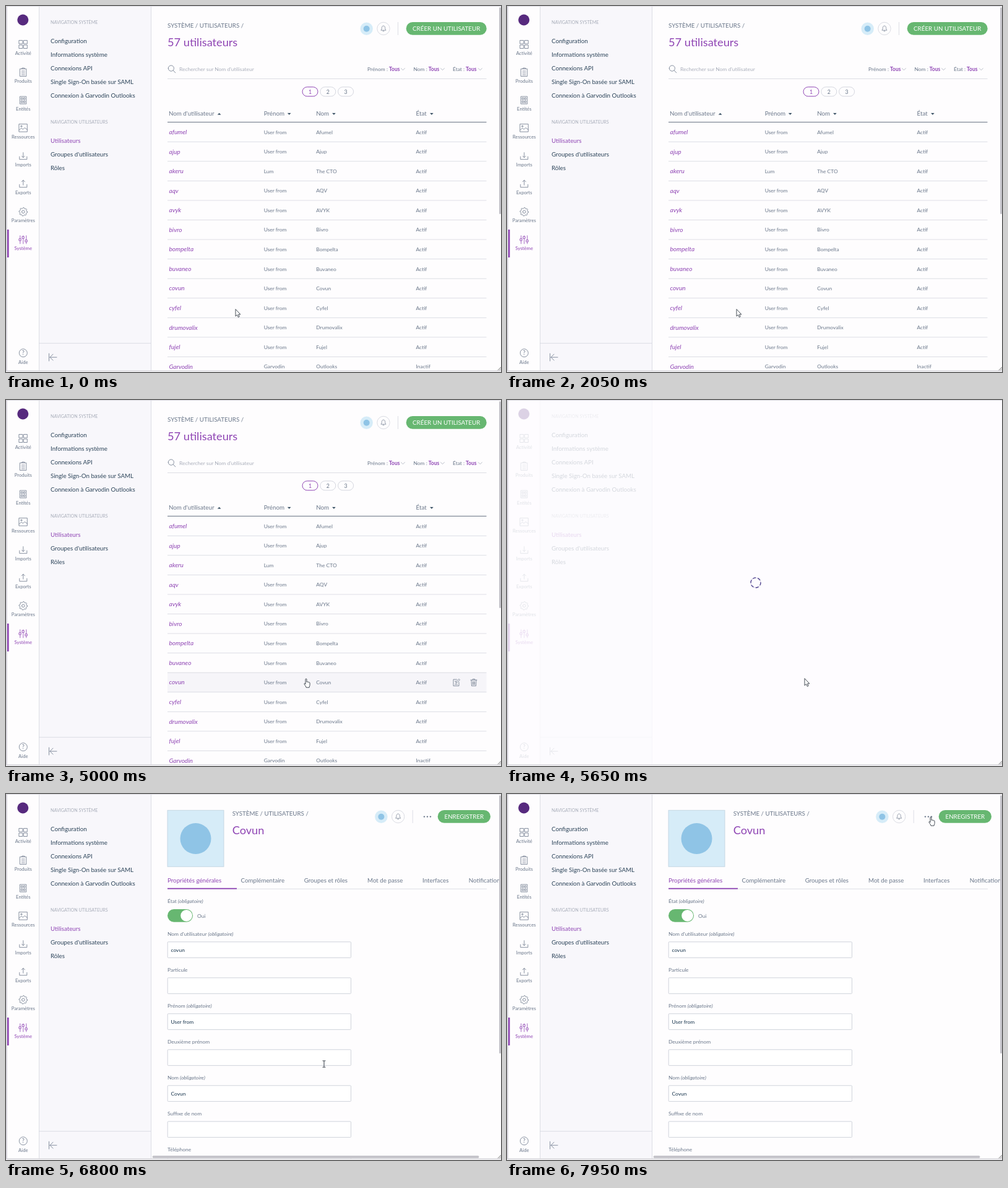
Recreate the animation shown at these times as an HTML page. Size 800 px wide and 591 px high, loop 8000 ms.

```html
<!DOCTYPE html>
<html lang="fr">
<head>
<meta charset="utf-8">
<title>Utilisateurs</title>
<style>
  html, body { margin: 0; width: 100%; height: 100%; overflow: hidden; background: #fefdfe; }
  svg { display: block; width: 100vw; height: 100vh; }
  text { font-family: Lato, "Open Sans", sans-serif; white-space: pre; }
</style>
</head>
<body>
<svg id="stage" viewBox="0 0 800 591" preserveAspectRatio="none"></svg>
<script>
const LOOP = 8000;
const C = {
  page: '#fefdfe', side: '#f8f7fb', line: '#d5d7df', soft: '#a9aeba', grey: '#6a778a',
  dark: '#2c4459', purple: '#8f45b4', green: '#67b771', sky: '#d6ecf8', blue: '#8fc4e6'
};
const NAME = 'Garvodin', TAIL = 'Outlooks', PICK = 'covun';
const cap = s => s[0].toUpperCase() + s.slice(1);

const text = (x, y, s, size, fill = C.grey, more = '') =>
  `<text x="${x}" y="${y}" font-size="${size}" fill="${fill}" ${more}>${s}</text>`;
const rect = (x, y, w, h, fill, more = '') =>
  `<rect x="${x}" y="${y}" width="${w}" height="${h}" fill="${fill}" ${more}/>`;
const disc = (x, y, r, fill, more = '') =>
  `<circle cx="${x}" cy="${y}" r="${r}" fill="${fill}" ${more}/>`;
const path = (x, y, d, color = C.grey, w = .8, fill = 'none') =>
  `<path transform="translate(${x} ${y})" d="${d}" fill="${fill}" stroke="${color}" stroke-width="${w}" stroke-linejoin="round" stroke-linecap="round"/>`;
const box = (x, y, w, h) => `M${x} ${y}h${w}v${h}h${-w}z`;
const ring = (x, y, r) => `M${x - r} ${y}a${r} ${r} 0 1 0 ${2 * r} 0a${r} ${r} 0 1 0 ${-2 * r} 0`;

const gear = () => {
  let d = '';
  for (let i = 0; i < 32; i++) {
    const a = i * Math.PI / 16, r = i % 4 < 2 ? 6.8 : 5.4;
    d += (i ? 'L' : 'M') + (r * Math.cos(a)).toFixed(2) + ' ' + (r * Math.sin(a)).toFixed(2);
  }
  return d + 'z' + ring(0, 0, 2.3);
};

const MENU = [
  ['Activité', box(-6.5, -6.5, 5.5, 5.5) + box(1, -6.5, 5.5, 5.5) + box(-6.5, 1, 5.5, 5.5) + box(1, 1, 5.5, 5.5)],
  ['Produits', box(-5, -5.5, 10, 12) + 'M-2 -5.5v-1.5h4v1.5M-2.5 -2h5M-2.5 1h5M-2.5 4h5'],
  ['Entités', box(-5, -6, 10, 12) + box(-3, -4, 2, 3) + box(1, -4, 2, 3) + box(-3, 1, 2, 3) + box(1, 1, 2, 3)],
  ['Ressources', box(-6.5, -6.5, 13, 12.5) + 'M-6.5 3l3.5 -3l2.5 2l3 -2.5l4 3' + ring(-2.8, -3, 1.1)],
  ['Imports', 'M-6 1v4.5h12v-4.5M0 -5.5v8M-2.3 .2l2.3 2.3l2.3 -2.3'],
  ['Exports', 'M-6 1v4.5h12v-4.5M0 2v-8M-2.6 -3.4l2.6 -2.6l2.6 2.6'],
  ['Paramètres', gear()],
  ['Système', 'M-5 -6.5v5M-5 1.5v5M-6.5 -1.5h3v3h-3zM0 -6.5v1.5M0 -2v8.5M-1.5 -5h3v3h-3zM5 -6.5v7M5 3.5v3M3.5 .5h3v3h-3z']
];

function sidebar() {
  let s = rect(2, 1, 51, 588, C.page) + rect(53, 1, 181.5, 588, C.side) +
    rect(53, 1, .8, 588, C.line) + rect(234, 1, .8, 588, C.line) + rect(53, 544.3, 181, .8, C.line);
  s += disc(27.3, 22.5, 9, '#572a7e') + rect(2, 361, 2.6, 45, C.purple);
  MENU.forEach(([label, d], i) => {
    const y = 62 + 45.05 * i, c = i === 7 ? C.purple : C.grey;
    s += path(27.8, y, d, c) + text(27.8, y + 17, label, 7.7, c, 'text-anchor="middle"');
  });
  s += disc(27.8, 560.3, 6.5, 'none', `stroke="${C.grey}" stroke-width=".8"`) +
    text(27.8, 563.4, '?', 9, C.grey, 'text-anchor="middle"') +
    text(27.8, 577.5, 'Aide', 7.7, C.grey, 'text-anchor="middle"') +
    path(75.5, 567.2, 'M-6 -6v12M6.5 0h-11M.5 -5l-5 5l5 5');
  s += text(72, 29.2, 'NAVIGATION SYSTÈME', 7.15, C.soft) + text(72, 190.3, 'NAVIGATION UTILISATEURS', 7.15, C.soft);
  ['Configuration', 'Informations système', 'Connexions API', 'Single Sign-On basée sur SAML', `Connexion à ${NAME} ${TAIL}`]
    .forEach((l, i) => s += text(72, 60.3 + 21.95 * i, l, 9.75, C.dark));
  ['Utilisateurs', "Groupes d'utilisateurs", 'Rôles']
    .forEach((l, i) => s += text(72, 221.3 + 21.95 * i, l, 9.75, i ? C.dark : C.purple));
  return s;
}

function header(x, title, tools, btn, btnX, btnW) {
  return text(x, 35.1, 'SYSTÈME / UTILISATEURS /', 9.75) + text(x, 64.8, title, 18.2, C.purple) +
    disc(tools, 36.7, 10.2, C.sky) + disc(tools, 36.7, 5, C.blue) +
    disc(tools + 27.3, 36.5, 10.2, C.page, `stroke="${C.line}" stroke-width=".9"`) +
    path(tools + 27.3, 36.3, 'M-3.8 2.6c1.3 -1 1 -3 1.2 -4.2c.3 -3.5 4.9 -3.5 5.2 0c.2 1.2 -.1 3.2 1.2 4.2zM-1 4.2h2', C.grey, .7) +
    rect(tools + 50.4, 26, .8, 21, C.line) +
    rect(btnX, 26, btnW, 20.8, C.green, 'rx="10.4"') +
    text(btnX + btnW / 2, 40.1, btn, 9.8, '#fff', 'text-anchor="middle"');
}

const ROW0 = 187.7, ROW = 31.56;
const USERS = ['afumel', 'ajup', 'akeru', 'aqv', 'avyk', 'bivro', 'bompelta', 'buvaneo', PICK, 'cyfel', 'drumovalix', 'fujel', NAME];

function list() {
  let s = `<g id="hover">${rect(261, 0, 515.5, ROW, '#f6f5f9')}` +
    path(727.5, 16, 'M1 -5h-5.5v10.5h9v-6M-2 -2h2M-2 3h4M-.5 .7l.5 -2l4.5 -4.5l1.5 1.5l-4.5 4.5z') +
    path(756, 16, 'M-5 -4h10M-1.7 -4v-1.5h3.4v1.5M-4 -4l.5 9.5h7l.5 -9.5M-1.6 -1.5v5M0 -1.5v5M1.6 -1.5v5') + '</g>';
  s += header(261, '57 utilisateurs', 582.7, 'CRÉER UN UTILISATEUR', 646.7, 130);
  s += path(266.8, 100.6, ring(0, 0, 4.6) + 'M3.4 3.4l3.6 3.8') +
    text(280, 105, "Rechercher sur Nom d'utilisateur", 8.45, C.soft) + rect(261, 117, 515.5, .8, C.line);
  [[584, 'Prénom :', 619, 641.5], [658.5, 'Nom :', 682.8, 705.5], [722, 'État :', 743, 766.3]].forEach(([x, l, v, a]) =>
    s += text(x, 105, l, 8.45, C.grey) + text(v, 105, 'Tous', 8.45, C.purple, 'font-weight="700"') + path(a, 102, 'M-3 -1.4l3 3l3 -3', C.soft));
  [1, 2, 3].forEach((n, i) => {
    const c = i ? C.grey : C.purple;
    s += rect(479 + 28.8 * i, 130.8, 25, 15, C.page, `rx="7.5" stroke="${i ? C.line : c}"`) +
      text(491.5 + 28.8 * i, 141.5, n, 8.8, c, 'text-anchor="middle"');
  });
  [[263, "Nom d'utilisateur", 344.7], [416.7, 'Prénom', 457.8], [501.3, 'Nom', 530], [662.5, 'État', 688]].forEach(([x, l, a], i) =>
    s += text(x, 177, l, 9.75) + path(a, 174, i ? 'M-2.4 -1h4.8l-2.4 2.4z' : 'M-2.4 1.4h4.8l-2.4 -2.4z', C.dark, .3, C.dark));
  s += rect(261, 187, 515.5, 1.1, '#737d8d');
  USERS.forEach((u, i) => {
    const y = ROW0 + ROW * i + 18.9;
    const first = i === 2 ? 'Lum' : i === 12 ? NAME : 'User from';
    const last = i === 2 ? 'The CTO' : i === 12 ? TAIL : i === 3 || i === 4 ? u.toUpperCase() : cap(u);
    s += text(263.5, y + .4, u, 10.1, C.purple, 'font-style="italic"') + text(416.7, y, first, 8.45) +
      text(501.3, y, last, 8.45) + text(662.5, y, i === 12 ? 'Inactif' : 'Actif', 8.45) +
      rect(261, ROW0 + ROW * (i + 1) - .4, 515.5, .8, C.line);
  });
  return s + rect(797, 2, 3, 334, '#c5c4ca', 'rx="1.5"');
}

const FIELDS = [["Nom d'utilisateur", 1, PICK], ['Particule', 0, ''], ['Prénom', 1, 'User from'], ['Deuxième prénom', 0, ''],
  ['Nom', 1, cap(PICK)], ['Suffixe de nom', 0, ''], ['Téléphone', 0, '']];
const must = '<tspan font-style="italic"> (obligatoire)</tspan>';

function form() {
  let s = rect(261, 26.3, 91, 91, C.sky, 'stroke="#c3d6e2" stroke-width=".9"') + disc(306.5, 72, 25, C.blue);
  s += header(365.7, cap(PICK), 606.4, 'ENREGISTRER', 697.7, 85.3);
  [676, 681, 686].forEach(x => s += disc(x, 36.6, 1.2, C.grey));
  [[261, 'Propriétés générales'], [379.5, 'Complémentaire'], [481.7, 'Groupes et rôles'], [584, 'Mot de passe'], [673, 'Interfaces'], [747.7, 'Notifications']]
    .forEach(([x, l], i) => s += text(x, 142.8, l, 9.75, i ? C.grey : C.purple));
  s += rect(261, 152.8, 516, .8, C.line) + rect(261, 151.8, 112, 1.8, C.purple);
  s += text(261, 176.3, 'État' + must, 8.45) + rect(261, 186, 41, 20.8, C.green, 'rx="10.4"') +
    disc(291.6, 196.4, 9.4, '#fff') + text(309, 199.5, 'Oui', 8.45);
  FIELDS.forEach(([l, need, v], i) => {
    const y = 226 + 58 * i;
    s += text(261, y + 3, l + (need ? must : ''), 8.45) +
      rect(261.2, y + 12.8, 296.3, 25.6, '#fff', `rx="1" stroke="#cbced7" stroke-width=".9"`) +
      text(266.5, y + 28.9, v, 8.45, '#16334c');
  });
  return s + rect(797, 2, 3, 417, '#c5c4ca', 'rx="1.5"') + rect(236.5, 584, 528, 4, '#c5c4ca', 'rx="2"');
}

const frame = rect(0, 588.6, 800, 2.4, '#fafafb') + rect(0, 588.6, 800, 1.4, '#d3d1d8') + rect(0, 0, 800, 1, '#dddce3') +
  rect(0, 0, 2, 590, '#d8d6de') + path(800, 588, 'M-5 0l5 -5M-2.5 0l2.5 -2.5', '#777', .9);

const ink = '#333a44';
const cursors = {
  arrow: path(0, 0, 'M0 0v11l2.6 -2.3l1.7 3.8l1.9 -.9l-1.7 -3.6h3z', ink, .9, '#fff'),
  hand: path(0, 0, 'M3 8.3v-7.2c0 -1.4 2 -1.4 2 0v4.3c.3 -1 1.7 -.8 1.8 .3c.4 -.8 1.6 -.5 1.7 .5c.6 -.7 1.6 -.2 1.6 .8v3.3c0 1.3 -.9 2 -1 3.9h-5c-.2 -1.6 -1.6 -3 -3 -5.3c-.8 -1.2 .6 -2 1.9 -.6z', ink, .9, '#fff'),
  beam: path(0, 0, 'M-2 -5.2h1.4l.6 .5l.6 -.5h1.4M0 -4.7v9.4M-2 5.2h1.4l.6 -.5l.6 .5h1.4', ink, 1)
};

const stage = document.getElementById('stage');
stage.innerHTML = rect(0, 0, 800, 591, C.page) + `<g id="list">${list()}</g><g id="form">${form()}</g>` + sidebar() +
  `<g id="load">${rect(2, 1, 798, 588, '#fefdff', 'opacity=".8"')}<g id="spin">` +
  disc(0, 0, 8, 'none', 'stroke="#dcd7ea" stroke-width="1.2"') +
  disc(0, 0, 8, 'none', 'stroke="#51458f" stroke-width="1.4" stroke-dasharray="5 3.38"') + '</g></g>' + frame +
  '<g id="cursor">' + Object.entries(cursors).map(([k, d]) => `<g id="${k}">${d}</g>`).join('') + '</g>';

const $ = id => document.getElementById(id);
const show = (id, on) => $(id).setAttribute('display', on ? 'inline' : 'none');
const move = (id, x, y, more = '') => $(id).setAttribute('transform', `translate(${x} ${y})${more}`);

const HIDE = 2950, BACK = 4000, LOAD = 5050, OPEN = 6350;
// time, x, y of the pointer
const MOVES = [[0, 371, 490], [HIDE, 371, 490], [BACK, 392, 484], [4450, 481, 450], [6400, 481, 450],
  [6750, 514, 436], [7550, 514, 436], [7900, 681, 37], [LOOP, 681, 37]];

function pointer(t) {
  const i = MOVES.findIndex((m, n) => n && t < m[0]);
  const [a, b] = [MOVES[i - 1], MOVES[i]];
  const p = (t - a[0]) / (b[0] - a[0]), e = p * p * (3 - 2 * p);
  return [a[1] + (b[1] - a[1]) * e, a[2] + (b[2] - a[2]) * e];
}

function shape(t, x, y) {
  if (t < BACK || (t >= LOAD && t < OPEN)) return 'arrow';
  if (t < LOAD) return 'hand';
  if (x > 671 && y < 46) return 'hand';
  const inField = x < 558 && FIELDS.some((f, i) => Math.abs(y - 251.6 - 58 * i) < 13);
  return inField ? 'beam' : 'arrow';
}

function draw(t) {
  const [x, y] = pointer(t), kind = shape(t, x, y);
  show('list', t < LOAD);
  show('load', t >= LOAD && t < OPEN);
  show('form', t >= OPEN);
  show('hover', t >= BACK && t < LOAD);
  move('hover', 0, ROW0 + ROW * Math.floor((y - ROW0) / ROW));
  move('spin', 402, 295, ` rotate(${t * .36 % 360})`);
  show('cursor', t < HIDE || t >= BACK);
  move('cursor', x, y);
  for (const k in cursors) show(k, k === kind);
}

function tick() {
  draw(performance.now() % LOOP);
  requestAnimationFrame(tick);
}
tick();
</script>
</body>
</html>
```
